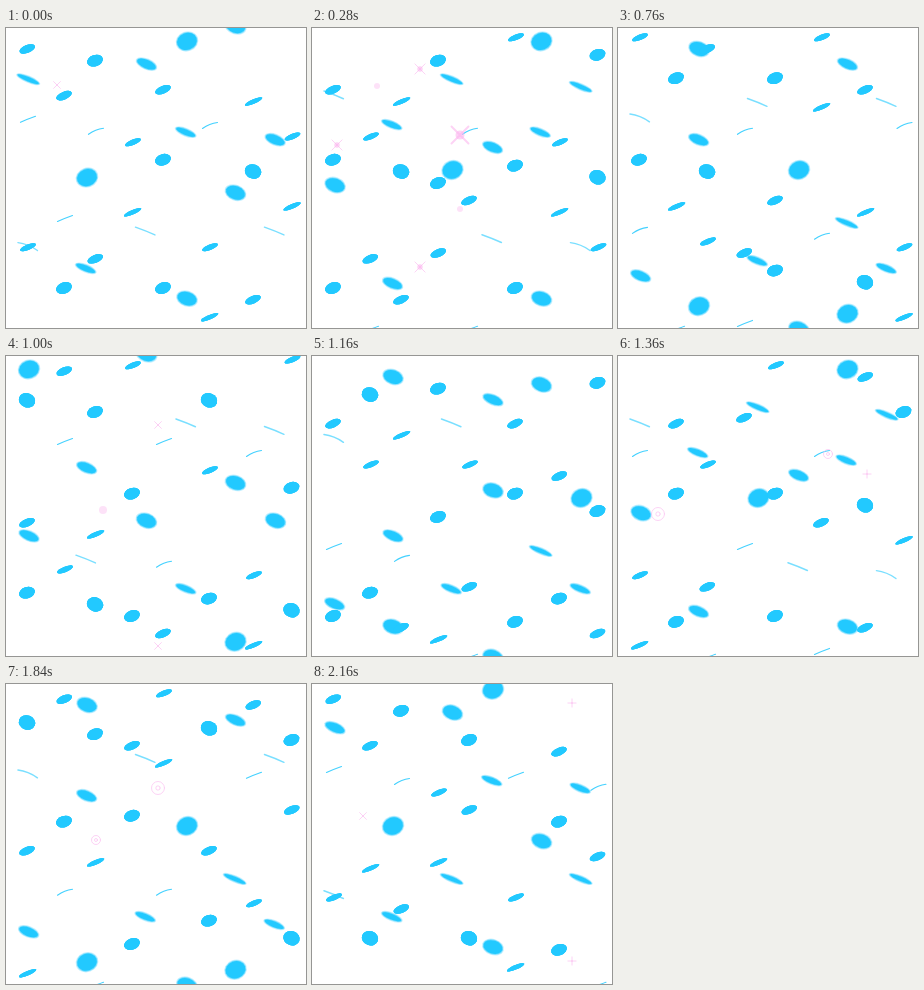
Animation of 300x300 px, one loop 2200 ms. Source, as an HTML page with a canvas:

```html
<!DOCTYPE html>
<html lang="en">
<head>
<meta charset="utf-8">
<title>Falling confetti</title>
<style>
  html, body { margin: 0; width: 100%; height: 100%; overflow: hidden; background: #fff; }
  canvas { display: block; }
</style>
</head>
<body>
<canvas id="stage" width="300" height="300"></canvas>
<script>
const ctx = document.getElementById('stage').getContext('2d');
const BLUE = '#22c9ff', PINK = '#fbb6ee';
const LOOP = 2200, STEP = 40, FRAMES = LOOP / STEP;
const mod = (a, n) => ((a % n) + n) % n;

// Poses of one tumbling flake: [dx, rx, ry, tilt in degrees]; the two edge-on poses are strokes.
const POSES = [
  [1, 8.4, 2.7, -22], [0.3, 8.2, 3.9, -22], [0, 8.1, 5.6, -18],
  [0, 8.3, 7.1, 20],
  [0, 8.1, 5.6, -20], [0, 8.3, 3.8, -23], [0.6, 9.4, 2.2, -23]
];
const EDGES = [[0, 0.2], [-1.8, 0.5]];   // bend and drop of each stroke

// Slow small flakes: column x and age of the first flake, in steps.
const SMALL = [[21, 3], [58, 32], [89, 5], [126, 19], [157, 10], [203, 37], [247, 12], [285.5, 18]];
const SMALL_GAPS = [0, 12, 34], SMALL_V = 5.83;

// Fast large flakes, mirrored and slightly out of focus.
const LARGE = [[23, -3.5], [81, 9], [140.5, -4.5], [181, 0], [229.5, -7], [269.5, 6.5]];
const LARGE_GAPS = [0, 6, 17], LARGE_V = 15.13, LARGE_SPAN = 27.5;

// Sparkles: last step, x, y, kind, radius.
const SPARKS = [
  [0, 51, 57, 'x', 4], [7, 108, 41, 'x', 6], [7, 148, 107, 'x', 10],
  [7, 25, 117, 'x', 6], [7, 108, 239, 'x', 6], [7, 65, 58, 'dot', 3],
  [7, 148, 181, 'dot', 3], [14, 268, 28, 'ring', 4.5], [25, 152, 69, 'x', 4],
  [25, 97, 154, 'dot', 4], [25, 152, 290, 'x', 4], [34, 210, 98, 'ring', 4.5],
  [34, 40, 158, 'ring', 6.5], [34, 249, 118, '+', 3.4], [46, 152, 104, 'ring', 6.5],
  [46, 90, 156, 'ring', 4.5], [54, 260, 19, '+', 3.4], [54, 260, 277, '+', 3.4]
];
const RISE = 75, SPARK_LIFE = 4;

// Softness fades the rim over that many pixels on each side.
function flake(x, y, pose, scale, mirror, soft) {
  ctx.save();
  ctx.translate(x, y);
  ctx.scale(mirror * scale, scale);
  if (pose < POSES.length) {
    const [dx, rx, ry, tilt] = POSES[pose];
    for (const [grow, alpha] of [[soft, 0.25], [0, 0.5], [-soft, 1]]) {
      ctx.globalAlpha = soft ? alpha : 1;
      ctx.beginPath();
      ctx.ellipse(dx, 0, rx + grow, ry + grow, tilt * Math.PI / 180, 0, 2 * Math.PI);
      ctx.fill();
    }
  } else {
    const [bend, dy] = EDGES[pose - POSES.length];
    ctx.globalAlpha = soft ? 0.6 : 0.85;
    ctx.lineWidth = 1.1;
    ctx.beginPath();
    ctx.moveTo(-6.5, 3.2 + dy);
    ctx.quadraticCurveTo(0.5, dy + bend, 8.5, -2.8 + dy);
    ctx.stroke();
  }
  ctx.restore();
}

function drawSmall(n) {
  for (const [x, start] of SMALL) for (const gap of SMALL_GAPS) {
    const age = (start + gap + n) % FRAMES;
    flake(x, age * SMALL_V + 3.5, Math.floor(age / 2) % 9, 1, 1, 0);
  }
}

function drawLarge(n) {
  const step = n > 27 ? n - 27 : n;
  for (const [x, start] of LARGE) for (const gap of LARGE_GAPS) {
    const age = mod(start + gap + step + 3, LARGE_SPAN) - 3;
    flake(x, age * LARGE_V + 13.4, mod(Math.floor(age + 0.6) + 3, 9), 1.3, -1, 0.6);
  }
}

function spark(x, y, kind, r) {
  const arms = kind === 'x' ? Math.PI / 4 : 0;
  ctx.globalAlpha = 0.6;
  ctx.lineWidth = r > 8 ? 2 : 1;
  ctx.beginPath();
  if (kind === 'ring') {
    ctx.arc(x, y, r, 0, 2 * Math.PI);
    ctx.moveTo(x + r / 3, y);
    ctx.arc(x, y, r / 3, 0, 2 * Math.PI);
    ctx.stroke();
  } else if (kind === 'dot') {
    ctx.globalAlpha = 0.4;
    ctx.arc(x, y, r, 0, 2 * Math.PI);
    ctx.fill();
  } else {
    for (let i = 0; i < 4; i++) {
      const a = arms + i * Math.PI / 2;
      ctx.moveTo(x, y);
      ctx.lineTo(x + r * 1.2 * Math.cos(a), y + r * 1.2 * Math.sin(a));
    }
    ctx.stroke();
    if (r > 5) {
      ctx.beginPath();
      ctx.arc(x, y, r * 0.45, 0, 2 * Math.PI);
      ctx.fill();
    }
  }
}

function drawSparks(n) {
  ctx.fillStyle = ctx.strokeStyle = PINK;
  for (const [end, x, y, kind, r] of SPARKS) {
    const left = mod(end - n, FRAMES);
    if (left < SPARK_LIFE) spark(x, y + left * RISE, kind, r);
  }
  ctx.globalAlpha = 1;
}

function draw(now) {
  const n = Math.floor((now % LOOP) / STEP);
  ctx.fillStyle = '#fff';
  ctx.fillRect(0, 0, 300, 300);
  ctx.fillStyle = ctx.strokeStyle = BLUE;
  ctx.lineCap = 'round';
  drawLarge(n);
  drawSmall(n);
  drawSparks(n);
}

const begin = performance.now();
function tick() {
  draw(performance.now() - begin);
  requestAnimationFrame(tick);
}
tick();
</script>
</body>
</html>
```
